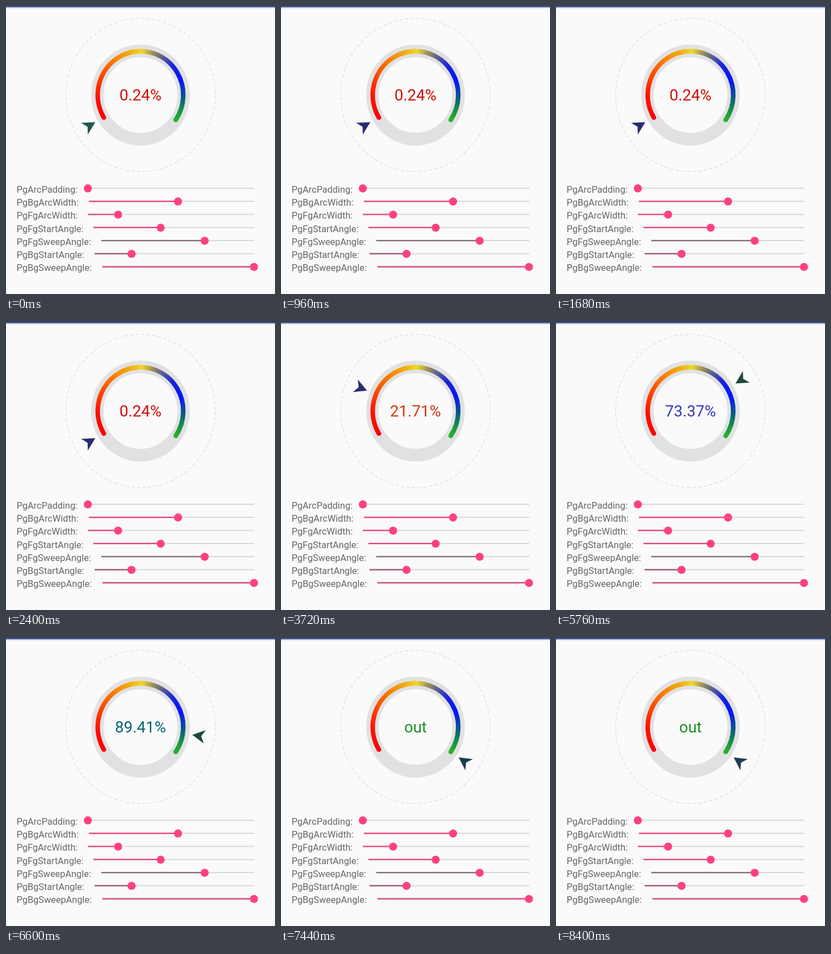
Animation of 480 by 512 pixels, one loop 8520 ms. Source, as an HTML page with a canvas:

```html
<!DOCTYPE html>
<html lang="en">
<head>
<meta charset="utf-8">
<title>Gauge</title>
<style>
  html, body { margin: 0; width: 100%; height: 100%; overflow: hidden; background: #fafafa; }
  canvas { display: block; width: 480px; height: 512px; }
</style>
</head>
<body>
<canvas id="stage" width="480" height="512"></canvas>
<script>
const ctx = document.getElementById("stage").getContext("2d");
const LOOP = 8520, STEP = 120;
const CX = 240, CY = 158.2, STRETCH = 1.02;
const rad = deg => deg * Math.PI / 180;
const START = rad(149), SWEEP = rad(245.5), FULL = Math.PI * 2;

const arcStops = [
  [0, "#ff0000"], [0.12, "#ff1200"], [0.22, "#fc4200"], [0.35, "#fa8404"],
  [0.44, "#f0b010"], [0.5, "#f0d82c"], [0.56, "#a09058"], [0.61, "#606888"],
  [0.69, "#1824dc"], [0.78, "#0414fc"], [0.88, "#08607e"], [0.94, "#149248"], [1, "#28b02c"]
];
const textStops = [
  [0, [208, 16, 8]], [0.22, [208, 56, 24]], [0.52, [226, 208, 44]],
  [0.78, [16, 24, 216]], [0.894, [4, 100, 112]], [1, [24, 144, 32]]
];

// Time in ms, percent, speed in percent per ms
const drag = [
  [3240, 0.24, 0.05], [3720, 21.71, 0.036], [4800, 52.18, 0.024],
  [6600, 89.41, 0.018], [7320, 100.5, 0.008]
];

// Label, track start, thumb position, progress colour
const sliders = [
  ["PgArcPadding:", 146, 146, "#f04880"],
  ["PgBgArcWidth:", 148, 307, "#e84478"],
  ["PgFgArcWidth:", 146, 200, "#e84c88"],
  ["PgFgStartAngle:", 156, 276, "#dc4878"],
  ["PgFgSweepAngle:", 170, 354.5, "#806c7c"],
  ["PgBgStartAngle:", 158, 224, "#a0587c"],
  ["PgBgSweepAngle:", 172, 442.5, "#d84878"]
];

const arcPaint = ctx.createConicGradient(START, 0, 0);
const turn = SWEEP / FULL;
for (const [at, color] of arcStops) arcPaint.addColorStop(at * turn, color);
arcPaint.addColorStop(0.85, "#28b02c");
arcPaint.addColorStop(0.85, "#ff0000");

function percentAt(t) {
  if (t <= drag[0][0]) return drag[0][1];
  const i = drag.findIndex(point => t < point[0]);
  if (i < 0) return drag[drag.length - 1][1];
  const [t0, p0, v0] = drag[i - 1], [t1, p1, v1] = drag[i];
  const span = t1 - t0, u = (t - t0) / span, w = 1 - u;
  return p0 * (1 + 2 * u) * w * w + v0 * span * u * w * w
       + p1 * u * u * (3 - 2 * u) - v1 * span * u * u * w;
}

function textColor(f) {
  const i = Math.max(1, textStops.findIndex(stop => f <= stop[0]));
  const [a, from] = textStops[i - 1], [b, to] = textStops[i];
  const u = (f - a) / (b - a);
  return `rgb(${from.map((c, k) => Math.round(c + (to[k] - c) * u)).join(",")})`;
}

function pointerColor(t) {
  if (t < 480) return "#1c5850";
  if (t < 5700) return "#2a2c70";
  return t < 7300 ? "#1c4a3a" : "#1c3e4c";
}

function strokeArc(radius, width, paint, start = 0, sweep = FULL) {
  ctx.beginPath();
  ctx.arc(0, 0, radius, start, start + sweep);
  ctx.lineWidth = width;
  ctx.strokeStyle = paint;
  ctx.stroke();
}

function drawGauge(t, fraction) {
  ctx.save();
  ctx.translate(CX, CY);
  ctx.scale(1, STRETCH);
  ctx.setLineDash([6, 4]);
  strokeArc(133.5, 1, "#d4d6d4");
  ctx.setLineDash([]);
  strokeArc(77, 22, "#e1e1e3");
  ctx.lineCap = "round";
  strokeArc(76.3, 8.2, arcPaint, START, SWEEP);

  ctx.rotate(START + SWEEP * fraction);
  ctx.fillStyle = pointerColor(t);
  ctx.beginPath();
  ctx.moveTo(93.5, 0);
  ctx.lineTo(116, -11.8);
  ctx.lineTo(109.5, 0);
  ctx.lineTo(116, 11.8);
  ctx.fill();
  ctx.restore();
}

function drawSlider([label, left, thumb, color], row) {
  const y = 324.3 + row * 23.27;
  ctx.fillStyle = "#666666";
  ctx.font = "16.5px Roboto, sans-serif";
  ctx.textAlign = "left";
  ctx.fillText(label, 19, y + 7.5);
  ctx.fillStyle = "#d3d5d6";
  ctx.fillRect(left, y - 1.2, 443 - left, 1.8);
  ctx.fillStyle = color;
  ctx.fillRect(left, y - 1.5, thumb - left, 2.4);
  ctx.fillStyle = "#ff4081";
  ctx.beginPath();
  ctx.arc(thumb, y, 7.2, 0, FULL);
  ctx.fill();
}

function draw(now) {
  const t = Math.floor(now % LOOP / STEP) * STEP;
  const percent = percentAt(t);
  const fraction = Math.min(percent / 100, 1);
  ctx.fillStyle = "#fafafa";
  ctx.fillRect(0, 0, 480, 512);
  ctx.fillStyle = "#38569e";
  ctx.fillRect(0, 0, 480, 2);
  ctx.fillStyle = "#c4c8d2";
  ctx.fillRect(0, 2, 480, 2);

  drawGauge(t, fraction);
  ctx.fillStyle = textColor(fraction);
  ctx.font = "28px Roboto, sans-serif";
  ctx.textAlign = "center";
  ctx.fillText(percent > 100 ? "out" : percent.toFixed(2) + "%", CX, 168);
  sliders.forEach(drawSlider);
}

const origin = performance.now();
function tick() {
  draw(performance.now() - origin);
  requestAnimationFrame(tick);
}
tick();
</script>
</body>
</html>
```
